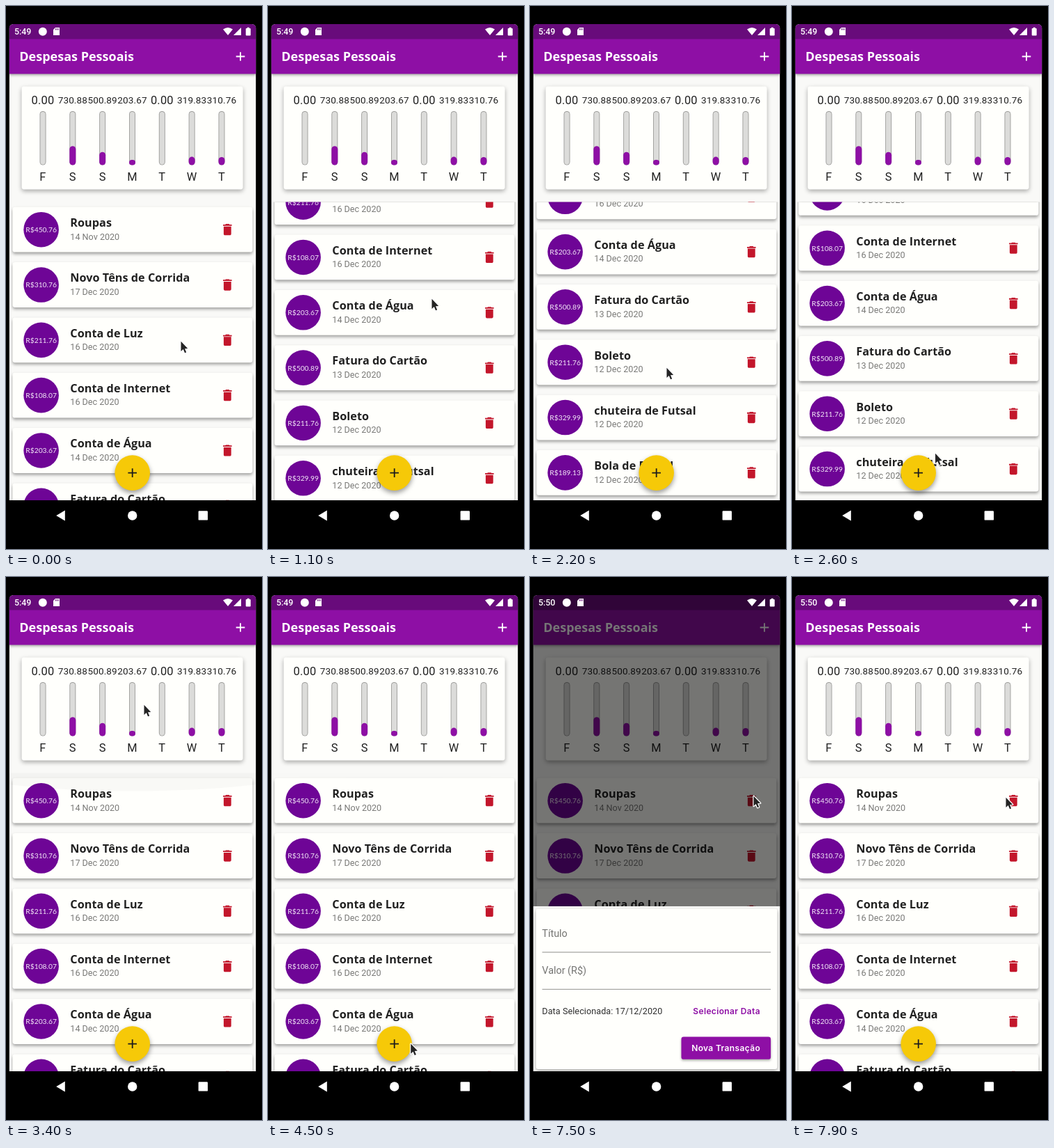
Write an HTML page with a canvas that moves like this. It is 368 by 780 pixels and loops after 8 s.

```html
<!DOCTYPE html>
<html lang="pt">
<head>
<meta charset="utf-8">
<title>Despesas Pessoais</title>
<style>
html, body { margin: 0; width: 100%; height: 100%; overflow: hidden; background: #000; }
canvas { display: block; width: 368px; height: 780px; }
</style>
</head>
<body>
<canvas id="stage"></canvas>
<script>
const W = 368, H = 780, LOOP = 8000, STEP = 100;
const canvas = document.getElementById('stage');
const c = canvas.getContext('2d');
const dpr = window.devicePixelRatio || 1;
canvas.width = W * dpr;
canvas.height = H * dpr;

const DP = 0.9014;
const PURPLE = '#8e0fa5', INK = '#212121', PAPER = '#fffffc';
const SCREEN = { x: 4.6, y: 26, w: 354.8, h: 684 };
const LIST_TOP = 281.5, PITCH = 88 * DP, MAX_SCROLL = 285.4;
const ROBOTO = 'Roboto, sans-serif', OPEN = '"Open Sans", sans-serif';
const LATO = 'Lato, sans-serif', INTER = 'Inter, sans-serif';

const items = [
  ['Roupas', '14 Nov 2020', '450.76'],
  ['Novo Têns de Corrida', '17 Dec 2020', '310.76'],
  ['Conta de Luz', '16 Dec 2020', '211.76'],
  ['Conta de Internet', '16 Dec 2020', '108.07'],
  ['Conta de Água', '14 Dec 2020', '203.67'],
  ['Fatura do Cartão', '13 Dec 2020', '500.89'],
  ['Boleto', '12 Dec 2020', '211.76'],
  ['chuteira de Futsal', '12 Dec 2020', '329.99'],
  ['Bola de Futsal', '12 Dec 2020', '189.13']
];
const days = [['F', 0], ['S', 730.88], ['S', 500.89], ['M', 203.67], ['T', 0], ['W', 319.83], ['T', 310.76]];
const total = days.reduce((sum, d) => sum + d[1], 0);

// Motion: ramp runs 0..1 between two times
const ramp = (t, from, to) => Math.max(0, Math.min(1, (t - from) / (to - from)));
const easeOut = u => 1 - (1 - u) ** 2;
const smooth = u => u * u * (3 - 2 * u);
const bump = (t, from, to) => Math.sin(Math.PI * ramp(t, from, to));

// Pointer gestures: start, end, target x, target y
const gestures = [
  [100, 300, 280, 509], [600, 1100, 235, 420],
  [1500, 1900, 200, 108], [1900, 2200, 196, 519],
  [2400, 2800, 215, 765], [2800, 3400, 198, 183],
  [3700, 4600, 205, 687], [4700, 5100, 196, 662],
  [5800, 6400, 226, 705], [6500, 7100, 354, 287],
  [7300, 7500, 321, 314], [7500, 7700, 299, 326], [7800, 7900, 307, 316]
];
function pointerAt(t) {
  let x = 251, y = 481;
  for (const [from, to, tx, ty] of gestures) {
    const u = smooth(ramp(t, from, to));
    x += (tx - x) * u;
    y += (ty - y) * u;
  }
  return [x, y];
}
function scrollAt(t) {
  const first = 247 * easeOut(ramp(t, 600, 1500));
  const rest = (MAX_SCROLL - 247) * easeOut(ramp(t, 1500, 1800));
  return (first + rest) * (1 - smooth(ramp(t, 2400, 3000)));
}
const glowAt = t => bump(t, 3000, 3600) + 0.6 * bump(t, 3800, 4600);
const sheetAt = t => (1 - (1 - ramp(t, 5830, 6150)) ** 3) * (1 - ramp(t, 7500, 7700) ** 1.6);

function shade(blur, dy, alpha) {
  c.shadowColor = `rgba(0,0,0,${alpha})`;
  c.shadowBlur = blur * dpr;
  c.shadowOffsetY = dy * dpr;
}
function rect(x, y, w, h, color, r = 0) {
  c.fillStyle = color;
  c.beginPath();
  c.roundRect(x, y, w, h, r);
  c.fill();
}
function raised(x, y, w, h, color, blur, dy, alpha) {
  c.save();
  shade(blur, dy, alpha);
  rect(x, y, w, h, color, 3.4);
  c.restore();
}
function disc(x, y, r, color) {
  c.fillStyle = color;
  c.beginPath();
  c.arc(x, y, r, 0, 7);
  c.fill();
}
function poly(color, ...pts) {
  c.fillStyle = color;
  c.beginPath();
  for (let i = 0; i < pts.length; i += 2) c.lineTo(pts[i], pts[i + 1]);
  c.closePath();
  c.fill();
}
function text(str, x, y, font, color, align = 'left', spacing = 0) {
  c.font = font;
  c.fillStyle = color;
  c.textAlign = align;
  c.letterSpacing = spacing + 'px';
  c.fillText(str, x, y);
}
function plus(x, y, color) {
  rect(x - 6.3, y - 0.9, 12.6, 1.8, color);
  rect(x - 0.9, y - 6.3, 1.8, 12.6, color);
}

const binShape = new Path2D('M6 19c0 1.1.9 2 2 2h8c1.1 0 2-.9 2-2V7H6v12zM19 4h-3.5l-1-1h-5l-1 1H5v2h14V4z');
function bin(x, y) {
  c.save();
  c.translate(x - 12 * DP, y - 12 * DP);
  c.scale(DP, DP);
  c.fillStyle = '#c3162b';
  c.fill(binShape);
  c.restore();
}

function drawItem([title, date, value], y) {
  raised(9.5, y - 32.4, 344.8, 64.8, PAPER, 4.5, 2.6, 0.36);
  disc(50.6, y, 25.3, '#6e0596');
  text('R$' + value, 50.6, y + 3.9, '10.3px ' + LATO, '#f3e8f7', 'center');
  text(title, 92.3, y - 4.2, '700 16.2px ' + OPEN, INK, 'left', 0.05);
  text(date, 92.3, y + 14.3, '12.6px ' + ROBOTO, '#7a7a78');
  bin(318.3, y);
}

function drawList(scroll, glow) {
  c.save();
  c.beginPath();
  c.rect(SCREEN.x, LIST_TOP, SCREEN.w, 710 - LIST_TOP);
  c.clip();
  items.forEach((item, i) => drawItem(item, 321.2 + PITCH * i - scroll));
  c.fillStyle = `rgba(0,0,0,${0.025 * glow})`;
  c.beginPath();
  c.ellipse(182, LIST_TOP, 230, 30 * glow, 0, 0, 7);
  c.fill();
  c.restore();
}

function drawChart() {
  raised(22.6, 115.6, 318, 147.8, PAPER, 6, 2.6, 0.33);
  days.forEach(([name, sum], i) => {
    const x = 53 + i * 42.83, top = 151, h = 77.6;
    if (sum) text(sum.toFixed(2), x, 139.8, '13.55px ' + ROBOTO, INK, 'center', 0.1);
    else text('0.00', x, 141, '16.4px ' + ROBOTO, INK, 'center', 0.2);
    rect(x - 4.5, top, 9, h, '#9c9c9a', 4.5);
    rect(x - 3.6, top + 0.9, 7.2, h - 1.8, '#dcdcda', 3.6);
    const fill = h * sum / total;
    if (fill) rect(x - 4.5, top + h - fill, 9, fill, PURPLE, Math.min(4.5, fill / 2));
    text(name, x, 251.2, '16.4px ' + ROBOTO, INK, 'center', 0.2);
  });
}

function drawAppBar() {
  c.save();
  shade(4, 2, 0.4);
  rect(SCREEN.x, 47, SCREEN.w, 50.4, PURPLE);
  c.restore();
  rect(SCREEN.x, 26, SCREEN.w, 21.4, '#680b7b');
  text('Despesas Pessoais', 19.3, 79, '700 18px ' + OPEN, '#fff');
  plus(337, 72.5, '#fff');
}

function drawStatus(clock) {
  text(clock, 12, 41.3, '500 12.4px ' + ROBOTO, '#fff');
  disc(52.8, 36.7, 6, '#fff');
  poly('#fff', 71, 31, 77, 31, 77, 42, 68, 42, 68, 34);
  for (let i = 0; i < 3; i++) rect(71 + i * 1.9, 32.2, 1, 2.4, '#680b7b');
  c.fillStyle = '#fff';
  c.beginPath();
  c.moveTo(319, 42);
  c.lineTo(312, 33.5);
  c.quadraticCurveTo(319, 28.5, 326, 33.5);
  c.fill();
  poly('#fff', 338, 31, 338, 42, 327, 42);
  rect(344.7, 32, 7, 10.5, '#fff', 1);
  rect(346.7, 30.7, 3, 2, '#fff');
}

function drawFab(pressed) {
  c.save();
  shade(7, 3.5, 0.4);
  disc(181.7, 670.6, 25.3, pressed ? '#efc20c' : '#f6c908');
  c.restore();
  plus(181.7, 670.6, '#1c1c1c');
}

function drawSheet(open) {
  if (open <= 0) return;
  rect(SCREEN.x, SCREEN.y, SCREEN.w, SCREEN.h, `rgba(0,0,0,${0.54 * open})`);
  c.save();
  c.translate(0, (1 - open) * 237);
  rect(SCREEN.x, 473, SCREEN.w, 240, '#fafaf8');
  raised(8.6, 476.6, 346.8, 230.4, PAPER, 5, 2, 0.34);
  [['Título', 517.2], ['Valor (R$)', 570.4]].forEach(([label, y]) => {
    text(label, 17.3, y, '14.4px ' + ROBOTO, '#747472');
    rect(17.5, y + 21.4, 328.6, 0.9, '#8e8e8c');
  });
  text('Data Selecionada: 17/12/2020', 17.3, 628, '12.6px ' + ROBOTO, '#2e2e2e', 'left', 0.08);
  const label = '600 12px ' + INTER;
  text('Selecionar Data', 282.6, 628, label, PURPLE, 'center', 0.35);
  raised(217.5, 660.6, 128.6, 32.2, PURPLE, 3.5, 2, 0.32);
  text('Nova Transação', 281.6, 681.2, label, '#fff', 'center', 0.35);
  c.restore();
}

function drawNav() {
  poly('#fff', 72.2, 732, 84.8, 724.6, 84.8, 739.4);
  disc(181.7, 732, 6.7, '#fff');
  rect(276.6, 725.2, 13.4, 13.4, '#fff', 1.2);
}

const arrow = new Path2D('M.5 .8V15L3.8 12L6 17.3L8.2 16.4L6 11.2L10.2 10.9Z');
function drawPointer(x, y) {
  c.save();
  c.translate(x, y);
  c.lineJoin = 'round';
  c.lineWidth = 2.4;
  c.strokeStyle = '#fff';
  c.stroke(arrow);
  c.fillStyle = '#242424';
  c.fill(arrow);
  c.restore();
}

function draw(t) {
  c.setTransform(dpr, 0, 0, dpr, 0, 0);
  rect(0, 0, W, H, '#000');
  c.save();
  c.beginPath();
  c.roundRect(SCREEN.x, SCREEN.y, SCREEN.w, SCREEN.h, [6, 6, 0, 0]);
  c.clip();
  rect(SCREEN.x, SCREEN.y, SCREEN.w, SCREEN.h, '#f9f9f7');
  drawChart();
  drawList(scrollAt(t), glowAt(t));
  drawAppBar();
  drawFab(t >= 5800 && t < 6200);
  drawSheet(sheetAt(t));
  drawStatus(t < 6200 ? '5:49' : '5:50');
  c.restore();
  drawNav();
  drawPointer(...pointerAt(t));
}

const start = performance.now();
function tick() {
  const t = (performance.now() - start) % LOOP;
  draw(Math.floor(t / STEP) * STEP);
  requestAnimationFrame(tick);
}
tick();
</script>
</body>
</html>
```
